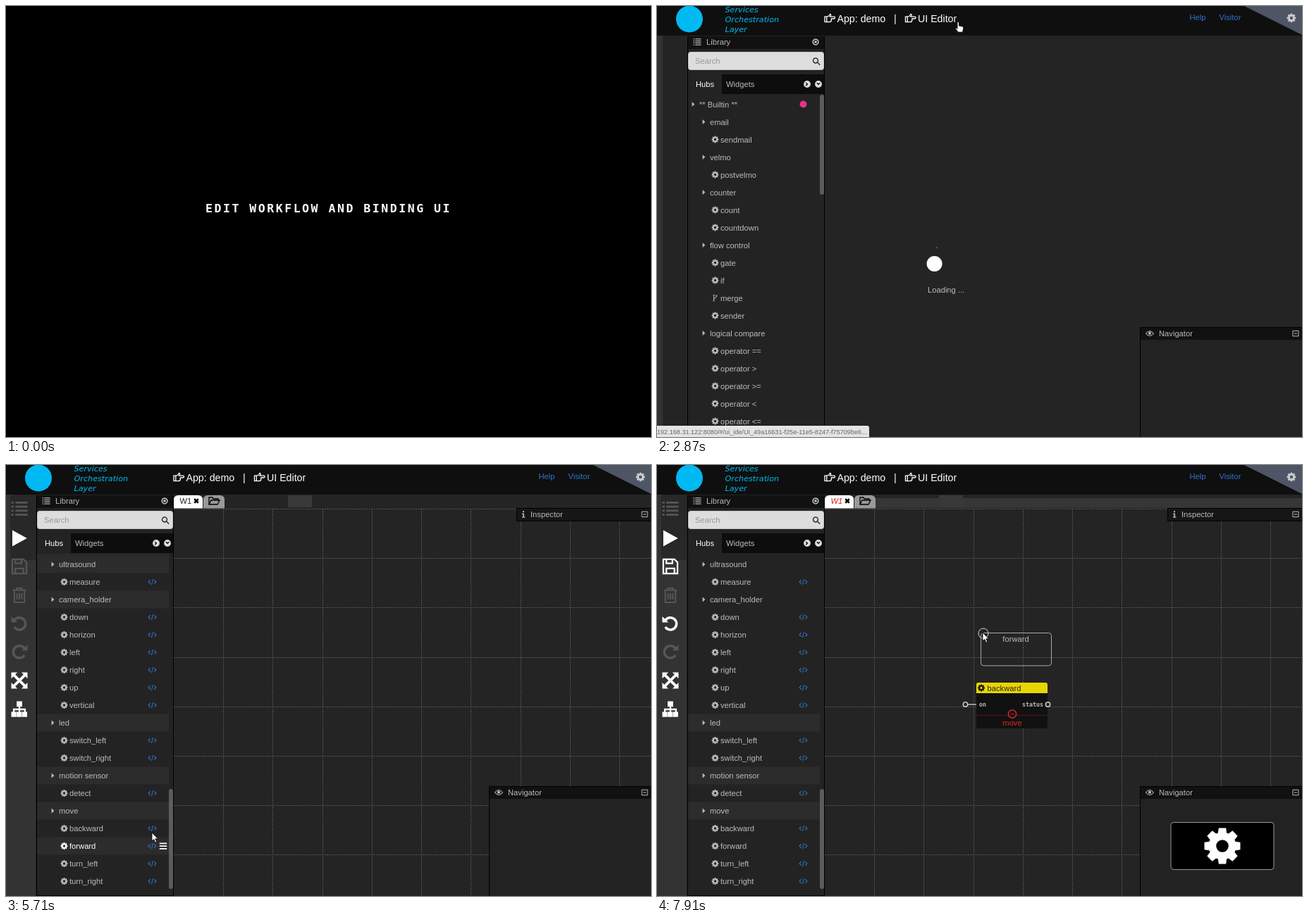
Recreate the animation shown at these times as an HTML page. Size 915 by 612 pixels, loop 8 s.

```html
<!DOCTYPE html>
<html lang="en">
<head>
<meta charset="utf-8">
<title>Edit workflow and binding UI</title>
<style>
html, body { margin: 0; width: 100%; height: 100%; overflow: hidden; background: #000; }
svg { display: block; width: 915px; height: 612px; }
text { font: 11.2px "Liberation Sans", Arial, sans-serif; fill: #bbb; white-space: pre; }
.big { font-size: 14.2px; fill: #fff; }
.title { font: bold 16.5px "DejaVu Sans Mono", monospace; letter-spacing: 2.53px; fill: #fff; }
.brand { font: italic 11.2px "DejaVu Sans", sans-serif; fill: #00b9f2; }
.link { fill: #2f74c8; }
.port { font: bold 8.3px "DejaVu Sans Mono", monospace; }
.url { font-size: 9.1px; fill: #666; }
.hint { fill: #999; }
.dark { fill: #222; }
.white { fill: #fff; }
.red { fill: #e01b1b; font-style: italic; }
.alert { fill: #d32b2b; }
.row .over { visibility: hidden; }
.row.on .over { visibility: visible; }
.row.on text { fill: #fff; }
.row.on .gear path { fill: #fff; }
</style>
</head>
<body>
<svg id="stage" viewBox="0 0 915 612"></svg>
<script>
const R = (x, y, w, h) => `M${x} ${y}h${w}v${h}h${-w}z`;
const O = (x, y, r) => `M${x - r} ${y}a${r} ${r} 0 1 0 ${2 * r} 0a${r} ${r} 0 1 0 ${-2 * r} 0z`;
const range = n => [...Array(n).keys()];
const polar = (r, a) => `${(r * Math.cos(a)).toFixed(2)} ${(r * Math.sin(a)).toFixed(2)}`;

const gearPath = "M" + range(8).map(i => [[6, -.32], [8, -.2], [8, .2], [6, .32]]
  .map(([r, d]) => polar(r, i * Math.PI / 4 + d)).join("L")).join("L") + "z" + O(0, 0, 2.7);

// Icons on a 16 unit square around 0,0: f is filled, s is stroked with width w
const ICONS = {
  gear: { f: gearPath },
  list: { f: [-6, -2, 2, 6].map(y => R(-8, y - 1, 2.4, 2) + R(-4, y - 1, 12, 2)).join("") },
  bars: { f: [-6, -1, 4].map(y => R(-7, y, 14, 2.4)).join("") },
  hand: { s: "M-7.5-3h3v8h-3zM-4.5-3l3-1l2-3q2.5 1 0 4h6a1.5 1.5 0 0 1 0 3h-4v2q0 3-3 3h-3l-2-1", w: 1.4 },
  text: { s: "M-6-3v-3h12v3M0-6v11M-3 5h6M-7 7.5h14", w: 1.8 },
  square: { f: R(-7, -7, 14, 14) },
  edit: { s: "M2-5h-9v11h11v-4", f: "M-3 3v-3l7-7l3 3l-7 7z", w: 1.6 },
  sliders: { s: "M-8-5h16M-8 0h16M-8 5h16", f: R(2, -7, 3, 4) + R(-5, -2, 3, 4) + R(1, 3, 3, 4), w: 1.5 },
  table: { f: R(-8, -6, 16, 12) + [-3, 0, 3].map(y => R(-6, y, 2, 1.5) + R(-3, y, 9, 1.5)).join("") },
  chart: { s: "M-8-7v13h16M-5 3l4-5l3 2l5-6", w: 1.8 },
  pie: { f: "M-1-6a7 7 0 1 0 7 7h-7zM1-8a7 7 0 0 1 7 7h-7z" },
  spin: { f: range(8).map(i => O(...polar(6, i * Math.PI / 4).split(" ").map(Number), 1.4)).join("") },
  gauge: { f: "M-8 5a8 8 0 1 1 16 0zM-1 3l2-7l1 .5l-.5 6.5z" + O(-5, 2, 1) + O(5, 2, 1) + O(-3, -2, 1) },
  image: { s: R(-7.5, -6, 15, 12), f: "M-5 4l3-4l2 2l3-5l3 7z" + O(-3.5, -2.5, 1.4), w: 1.4 },
  toggle: { s: "M-4-4.5h8a4.5 4.5 0 0 1 0 9h-8a4.5 4.5 0 0 1 0-9z", f: O(-4, 0, 4), w: 1.5 },
  bulb: { s: "M-2 3q0-2-1.5-3.5a4.4 4.4 0 1 1 7 0q-1.5 1.5-1.5 3.5zM-1.5 6.5h3", w: 1.5 },
  move: { s: "M-6 0h12M0-6v12", f: "M-8 0l3-3v6zM8 0l-3-3v6zM0-8l-3 3h6zM0 8l-3-3h6z", w: 1.8 },
  grid: { f: R(-8, -6, 7.3, 5.5) + R(.7, -6, 7.3, 5.5) + R(-8, 1, 7.3, 5.5) + R(.7, 1, 7.3, 5.5) },
  video: { f: R(-8, -5, 10, 10) + "M3-1l5-4v10l-5-4z" },
  fork: { s: "M-3-5v10M3-4q0 4-6 6" + O(-3, -6, 1.2) + O(3, -5, 1.2) + O(-3, 6, 1.2), w: 1.6 },
  code: { s: "M-4-4l-4 4l4 4M4-4l4 4l-4 4M1.5-6l-3 12", w: 1.6 },
  search: { s: O(-1.5, -1.5, 5) + "M2.5 2.5l5 5", w: 2.2 },
  caret: { f: "M-3-5.5l6 5.5l-6 5.5z" },
  close: { s: O(0, 0, 6.2) + "M-2.5-2.5l5 5M2.5-2.5l-5 5", w: 2.4 },
  next: { f: O(0, 0, 7.5) + "M-2-4l4 4l-4 4l-1.5-1.5l2.5-2.5l-2.5-2.5z" },
  down: { f: O(0, 0, 7.5) + "M-4-2l4 4l4-4l-1.5-1.5l-2.5 2.5l-2.5-2.5z" },
  minus: { s: R(-6.5, -6, 13, 12) + "M-3.5 0h7", w: 1.6 },
  info: { f: R(-1.5, -7, 3, 3) + "M-3-2h4.5v7h2v2h-6.5v-2h2v-5h-2z" },
  eye: { s: "M-8 0q8-10 16 0q-8 10-16 0z", f: O(0, -.5, 3), w: 1.5 },
  folder: { s: "M-7 5v-10h5l1 2h7v2M-7 5l3-6h12l-3 6z", w: 1.3 },
  save: { s: "M-7-7h11l3 3v11h-14zM-4 7v-5h8v5M-4-7v4h6v-4", w: 1.6 },
  trash: { s: "M-6.5-5h13M-2.5-5v-2h5v2M-5-5v12h10v-12M-2.3-2v6M0-2v6M2.3-2v6", w: 1.4 },
  undo: { s: "M-5-3a6 6 0 1 1 0 6.5", f: "M-8-7v6h6z", w: 2.4 },
  redo: { s: "M5-3a6 6 0 1 0 0 6.5", f: "M8-7v6h-6z", w: 2.4 },
  expand: { s: "M-6-6l12 12M6-6l-12 12", f: "M-8-8h6l-6 6zM8-8h-6l6 6zM-8 8h6l-6-6zM8 8h-6l6-6z", w: 2.6 },
  tree: { f: R(-2.7, -8, 5.4, 5.4) + [-8, -2.7, 2.6].map(x => R(x, 2.5, 5, 5)).join(""), s: "M0-3v6M-5.5 3v-3h11v3", w: 1.6 },
  play: { f: "M-7-8l14.5 8l-14.5 8z" },
  cross: { s: "M-4-4l8 8M4-4l-8 8", w: 3.6 },
  resize: { s: "M-5-5l10 10", f: "M-7.5-7.5h6l-6 6zM7.5 7.5h-6l6-6z", w: 1.8 }
};

const icon = (name, x, y, size = 11, color = "#bbb") => {
  const { f, s, w } = ICONS[name];
  return `<g class="${name}" transform="translate(${x} ${y}) scale(${size / 16})">` +
    (f ? `<path d="${f}" fill="${color}" fill-rule="evenodd"/>` : "") +
    (s ? `<path d="${s}" fill="none" stroke="${color}" stroke-width="${w}"/>` : "") + "</g>";
};
const rect = (x, y, w, h, fill, more = "") => `<rect x="${x}" y="${y}" width="${w}" height="${h}" fill="${fill}" ${more}/>`;
const disc = (x, y, r, fill, more = "") => `<circle cx="${x}" cy="${y}" r="${r}" fill="${fill}" ${more}/>`;
const label = (x, y, s, cls = "", more = "") =>
  `<text x="${x}" y="${y}" class="${cls}" ${more}>${s.replace(/</g, "&lt;")}</text>`;
const path = (d, fill, more = "") => `<path d="${d}" fill="${fill}" ${more}/>`;
const group = (id, ...parts) => `<g id="${id}">${parts.join("")}</g>`;

const header = (name, color) => rect(0, 0, 915, 42, color) +
  disc(46, 18.5, 19, "#00b9f2") +
  ["Services", "Orchestration", "Layer"].map((s, i) => label(96.5, 8.5 + 14 * i, s, "brand")).join("") +
  icon("hand", 245, 18, 15, "#fff") + label(255.5, 23, "App: demo", "big") + label(336, 23, "|", "big") +
  icon("hand", 359.5, 18, 15, "#fff") + label(370, 23, name, "big") +
  label(755.5, 20, "Help", "link") + label(797.5, 20, "Visitor", "link") +
  path("M833 0h82v41z", "#4e5565") + icon("gear", 900, 17, 13, "#ccc");

const panelHead = name => rect(43, 43, 195, 569, "#000") + rect(44, 43, 193, 18, "#111") +
  icon("list", 57, 51, 11) + label(70, 55, name);
const search = rect(44.5, 65.5, 192, 25, "#ddd", 'rx="3" stroke="#c4c4c4"') +
  label(54, 82, "Search", "hint") + icon("search", 226, 78.5, 11, "#333");
const tab = (x, w, fill) => path(`M${x} 61.5v-12q0-6.5 6.5-6.5h${w - 13}q6.5 0 6.5 6.5v12z`, fill);
const tabs = tab(280, 30, "#999") + tab(238, 41, "#fff") +
  icon("cross", 270, 51, 11, "#000") + icon("folder", 295, 51, 16, "#000");
const inspector = rect(724, 61, 191, 19, "#000") + rect(725, 62, 190, 17, "#161616") +
  icon("info", 734, 70, 11) + label(744, 74, "Inspector") + icon("minus", 906, 70, 10);

const WIDGETS = `Text:text,Button:square,Editbox:edit,Slider:sliders,Combo box:table,Fan:gear,LineChart:chart,
PieChart:pie,Progress:spin,Gauge:gauge,Image:image,Switch:toggle,Light:bulb,Four Arrows:move,Digital Clock:grid,
liquid Fill Gauge:gauge`.split(/,\s*/).map(s => s.split(":"));

const caretRow = (x, y, s) => icon("caret", x, y, 10) + label(x + 8.5, y + 4, s);
const widgetList = caretRow(51.5, 108, "Builtin UI") + disc(221, 108, 5, "#ff9020") + caretRow(67.5, 133, "basic") +
  WIDGETS.map(([s, i], n) => icon(i, 84, 158 + 25 * n, 10.5) + label(92, 162 + 25 * n, s)).join("") +
  caretRow(67.5, 557.5, "webrtc") + icon("video", 84, 582, 11) + label(92, 586, "video");

// "^" opens a hub, ">" a group
const ROWS = `^** Builtin **,>email,sendmail,>velmo,postvelmo,>counter,count,countdown,>flow control,gate,if,merge,
sender,>logical compare,operator ==,operator >,operator >=,operator <,operator <=,operator !=,>logical,and,or,not,
>math,add,subtract,multiply,divide,random,>text,join,split,replace,>timer,delay,interval,clock,>storage,load,store,
>debug,console,trace,^** Car **,>ultrasound,measure,>camera_holder,down,horizon,left,right,up,vertical,>led,
switch_left,switch_right,>motion sensor,detect,>move,backward,forward,turn_left,turn_right`.split(/,\s*/);
const HUB2 = ROWS.lastIndexOf("^** Car **");
const SCROLL = 25 * (HUB2 + 1) - 1.5;

const listRow = (s, i) => {
  const y = 139.5 + 25 * i, kind = s[0], name = s.replace(/^[\^>](?=\S)/, "");
  const back = cls => rect(44, y - 12.5, 187, 25, "#2c2c2c", `class="${cls}"`);
  let body;
  if (kind === "^") body = back("band") + caretRow(51.5, y, name) + disc(207.5, y, 5, "#e2367f");
  else if (kind === ">") body = back("band") + caretRow(66.5, y, name);
  else body = back("over") + icon(name === "merge" ? "fork" : "gear", 82.5, y, 10) + label(90, y + 4, name) +
    (i > HUB2 ? icon("code", 207.5, y, 11, "#2f6fb5") : "") +
    `<g class="over">${icon("bars", 223, y, 12, "#fff")}</g>`;
  return `<g class="row" data-name="${name}">${body}</g>`;
};

const library = panelHead("Library") + icon("close", 225, 51, 10, "#ccc") + rect(44, 61, 193, 550, "#232323") + search +
  rect(92, 97, 145, 28, "#0d0d0d") + label(55, 115, "Hubs", "white") + label(98, 115, "Widgets") +
  icon("next", 213, 111, 10.5, "#ddd") + icon("down", 229, 111, 10.5, "#ddd") +
  `<g clip-path="url(#list)">${group("rows", ...ROWS.map(listRow))}</g>` +
  rect(231, 126, 6, 142, "#666", 'id="thumb" rx="3"');

const gridLines = range(9).map(i => `M${308.5 + Math.round(70.25 * i)} 62v550`).join("") +
  range(8).map(i => `M238 ${62.5 + Math.round(70.2 * i)}h677`).join("");

const navigatorPanel = rect(685, 456, 230, 156, "#000") + rect(686, 474, 229, 138, "#222") + rect(686, 457, 229, 17, "#111") +
  icon("eye", 699, 465, 11) + label(712, 469, "Navigator") + icon("minus", 906, 465, 10);

const tools = [["list", 62, 0], ["play", 104, 1], ["trash", 185, 0], ["redo", 265, 0], ["expand", 306, 1], ["tree", 347, 1]];
const tool = (name, y, on) => icon(name, 19, y, 23, on ? "#fff" : "#565656");

const ring = (x, y, r, color, fill = "none") => disc(x, y, r, fill, `stroke="${color}" stroke-width="1.5"`);
const node = path("M453 324v-12q0-3 3-3h95q3 0 3 3v12z", "#e8d502") + icon("gear", 460, 316.5, 10, "#111") +
  label(468.5, 320.5, "backward", "dark") +
  path("M453 324h101v47q0 3-3 3h-95q-3 0-3-3z", "#111") + path("M453 355.5h101", "none", 'stroke="#5c1616"') +
  ring(504, 353.5, 5.6, "#dd2a2a", "#111") + path("M501.5 355l2.5-2.5l2.5 2.5", "none", 'stroke="#dd2a2a"') +
  label(504, 370, "move", "alert", 'text-anchor="middle"') +
  label(457, 342.5, "on", "port") + label(518, 342.5, "status", "port") +
  path("M441 340h12", "none", 'stroke="#bbb" stroke-width="1.5"') +
  ring(437.5, 340, 3.2, "#ccc", "#222") + ring(554.5, 340, 3.2, "#ccc", "#222");

const popover = (id, y, s) => group(id, rect(208, y, 141, 56, "#ddd", 'rx="4"') + path(`M208 ${y + 21}l-6 7l6 7z`, "#ddd") +
  label(220, y + 16, s, "dark") + label(220, y + 44.5, s + " or not", "dark"));

const uiScene = group("ui",
  rect(0, 0, 915, 612, "#333"), header("Workflow Editor", "#151515"),
  panelHead("Widgets"), rect(44, 61, 193, 550, "#333"), search, widgetList,
  tabs, label(247, 55, "U1", "dark"), inspector, tool("save", 62), tool("trash", 104),
  rect(308, 218.5, 215, 185.5, "#171717"),
  path("M416 218.5l31 62.5h-62zM416 405l31-62h-62zM322.5 312l62.5-31v62zM509.5 312l-62.5-31v62z", "#eee"),
  group("handle", icon("resize", 516.5, 397, 10)));

const flowScene = group("flow",
  rect(0, 0, 915, 612, "#333"), rect(8, 42, 907, 570, "#242424"), header("UI Editor", "#0f0f0f"),
  group("load", group("dots", disc(-1.4, 11, 11, "#fff"), disc(2, -12, 11, "#fff", 'id="dot2"')), label(384, 407, "Loading ...")),
  group("work",
    rect(6, 135, 36, 477, "#333"), rect(6, 43, 36, 92, "#282828"),
    group("strip", rect(310, 47, 605, 14, "#363636")), group("patch", rect(400, 43, 34, 17, "#393939")),
    path(gridLines, "none", 'stroke="#575757" stroke-dasharray="2 1.5"'),
    tabs, inspector, tools.map(a => tool(...a)).join(""),
    group("clean", label(246.5, 55, "W1", "dark"), tool("save", 144), tool("undo", 225)),
    group("dirty", label(246.5, 55, "W1", "red"), tool("save", 144, 1), tool("undo", 225, 1), node)),
  library, navigatorPanel,
  group("preview", rect(729, 507.5, 146, 67, "#000", 'rx="4" stroke="#999"'), icon("gear", 802, 541, 52, "#fff")),
  popover("popBack", 487, "backward"), popover("popFwd", 512, "forward"),
  group("ghost", rect(-2.5, .5, 100, 46.5, "none", 'rx="4" stroke="#aaa"'),
    label(47, 13, "", "", 'id="ghostName" text-anchor="middle"'), disc(1, 1, 7, "none", 'stroke="#ddd"')));

document.getElementById("stage").innerHTML =
  `<defs><clipPath id="list"><path d="${R(44, 126, 187, 485)}"/></clipPath></defs>` +
  group("title", rect(0, 0, 915, 612, "#000"), label(283, 292.7, "EDIT WORKFLOW AND BINDING UI", "title")) +
  uiScene + flowScene +
  group("status", path("M0 596h298q3 0 3 3v13h-301z", "#e4e4e4"),
    label(0, 607.5, "192.168.31.122:8080/#/ui_ide/UI_49a16631-f25e-11e5-8247-f75709be6...", "url")) +
  group("arrow", path("M0 0v12l2.8-2.5l2 4.6l2-.9l-2-4.4h3.8z", "#fff", 'stroke="#000" stroke-width=".8"')) +
  group("point", path("M0 1q1.3-1.6 2.4 0v5l5.5 1.2q1 .5.8 2l-1 6h-6.4l-4-5q-.3-1.6 1.4-1l1.3 1.2z", "#fff",
    'stroke="#000" stroke-width=".9"'));

const POINTER = [
  [0, 0, 0], [500, 514, 309], [1280, 512, 300], [1430, 510, 280], [1550, 495, 225], [1670, 472, 150], [1790, 447, 75],
  [1910, 433, 28], [2050, 432, 25], [2170, 430, 24], [2300, 428, 23], [2570, 426, 22], [3790, 403, 60], [3940, 370, 85],
  [4060, 310, 125], [4180, 245, 157], [4300, 236, 158], [4450, 231, 158], [4700, 231, 166], [4840, 233, 200],
  [4960, 240, 285], [5080, 244, 375], [5200, 242, 455], [5320, 238, 500], [5590, 229, 511], [5710, 207, 522],
  [5860, 160, 516], [6000, 135, 513], [6150, 118, 512], [6270, 100, 512], [6390, 92, 511], [6530, 223, 471],
  [6650, 380, 302], [6800, 456, 309], [6950, 355, 436], [7100, 93, 535], [7220, 92, 537], [7370, 91, 538],
  [7520, 252, 456], [7670, 330, 380], [7790, 410, 295], [7910, 462, 238]];

const SPANS = {
  title: [0, 500], ui: [500, 2870], handle: [500, 1550], flow: [2870, 8000], load: [2870, 3260], work: [3260, 8000],
  strip: [6950, 8000], patch: [3790, 8000], clean: [3260, 6950], dirty: [6950, 8000], preview: [6950, 8000],
  status: [2050, 3940], point: [2050, 3790]
};

const $ = id => document.getElementById(id);
const show = (id, on) => { $(id).style.display = on ? "" : "none"; };
const place = (id, x, y, more = "") => $(id).setAttribute("transform", `translate(${x} ${y})${more}`);
const within = (t, a, b) => t >= a && t < b;
const rowEls = [...document.querySelectorAll(".row")];

const hovered = t => within(t, 5590, 5710) || within(t, 5860, 6530) ? "backward"
  : within(t, 5710, 5860) || within(t, 7220, 7520) ? "forward" : "";
const banded = (name, t) => within(t, 3260, 6950) || t >= 6950 && /^mo/.test(name) || t >= 7520 && name === "led";

function draw(t) {
  for (const id in SPANS) show(id, within(t, ...SPANS[id]));
  const [, x, y] = POINTER.findLast(p => p[0] <= t);

  show("arrow", t >= 500 && !within(t, ...SPANS.point));
  place("arrow", x, y);
  place("point", x, y);

  const first = within(t, 6530, 6950);
  show("ghost", first || t >= 7520);
  place("ghost", x, y);
  $("ghostName").textContent = first ? "backward" : "forward";

  const p = t < 4840 ? 0 : t < 5590 ? Math.min(1, (y - 166) / 334) : 1;
  place("rows", 0, -SCROLL * p);
  place("thumb", 0, 334 * p);
  $("thumb").setAttribute("fill", within(t, 4450, 5590) ? "#999" : "#5c5c5c");

  const hot = hovered(t);
  rowEls.forEach(el => {
    const name = el.dataset.name, band = el.querySelector(".band");
    el.classList.toggle("on", name === hot);
    if (band) band.style.display = banded(name, t) ? "" : "none";
  });

  $("popBack").style.opacity = within(t, 6000, 6530) ? 1 : within(t, 5860, 6000) || within(t, 7100, 7220) ? .4 : 0;
  $("popFwd").style.opacity = within(t, 7370, 7520) ? 1 : within(t, 7220, 7370) ? .4 : 0;

  const k = Math.min(2, Math.max(0, Math.floor((t - 2870) / 120)));
  place("dots", 395, 355, ` rotate(${21.6 * k})`);
  place("dot2", 2, -12, ` scale(${.05 + .05 * k * k}) translate(-2 12)`);
}

(function loop() {
  draw(performance.now() % 8000);
  requestAnimationFrame(loop);
})();
</script>
</body>
</html>
```
